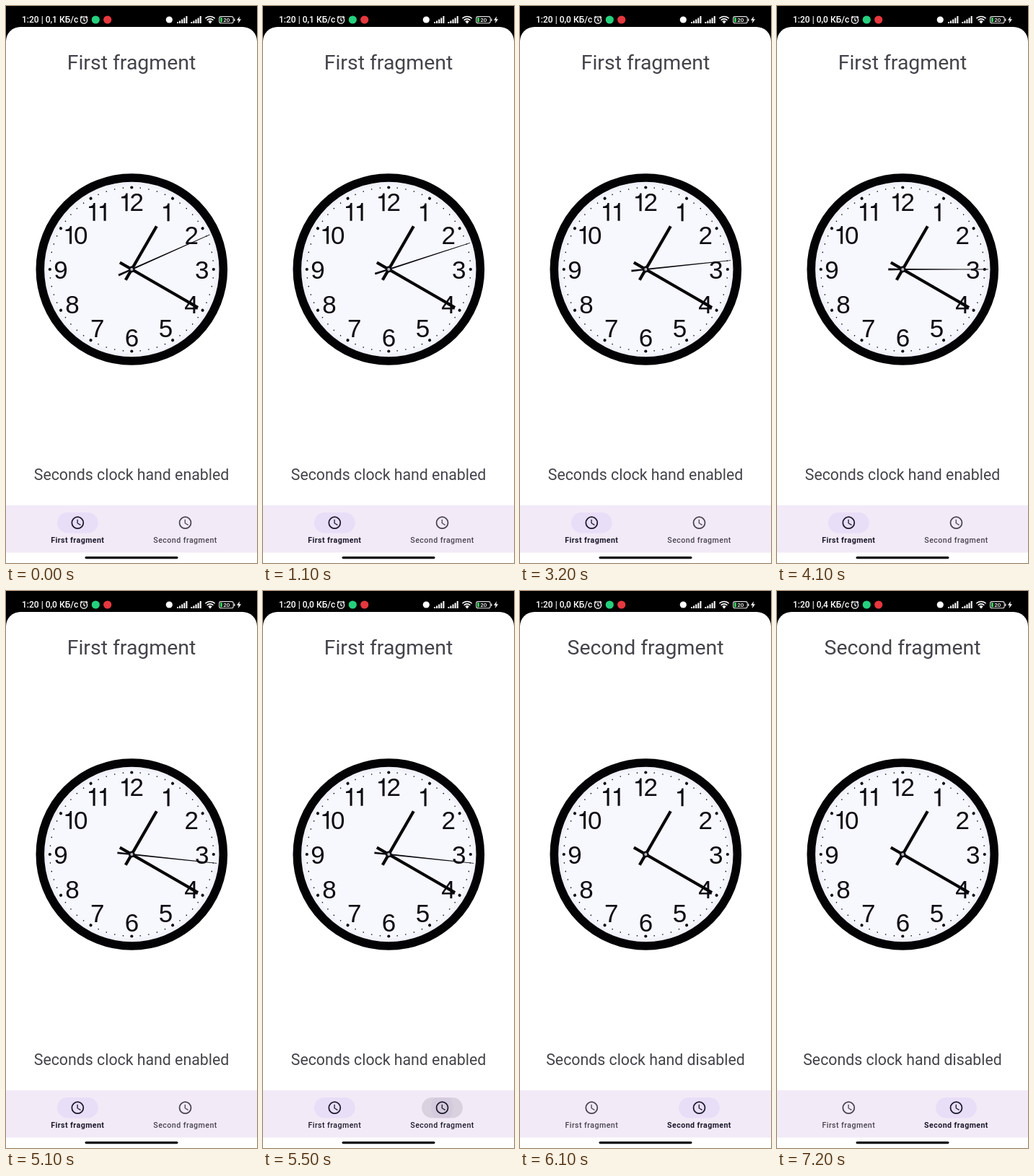
Animation of 348 by 772 pixels, one loop 8000 ms. Source, as an HTML page:

```html
<!DOCTYPE html>
<html lang="en">
<head>
<meta charset="utf-8">
<style>
html, body { margin: 0; height: 100%; overflow: hidden; background: #000; }
svg { display: block; width: 100vw; height: 100vh; font-family: Roboto, sans-serif; }
.mid { text-anchor: middle; }
.digit { font: 35px "Liberation Sans", Arial, sans-serif; text-anchor: middle; }
.label { font-size: 10.63px; letter-spacing: .44px; text-anchor: middle; }
</style>
</head>
<body>
<svg viewBox="0 0 348 772">
  <defs>
    <radialGradient id="face">
      <stop offset=".9" stop-color="#f7f7fe"/>
      <stop offset="1" stop-color="#e6e6f2"/>
    </radialGradient>
    <path id="one" d="M.101-.505V-.568C.22-.58 .255-.6 .282-.703H.346V0H.258V-.505z"/>
    <g id="schedule">
      <circle cx="12" cy="12" r="9" fill="none" stroke="currentColor" stroke-width="2"/>
      <path d="M11 7h1.5v5.25l4.5 2.67-.75 1.23L11 13z" fill="currentColor"/>
    </g>
    <path id="bars" d="M0 24v-2h2v2zM3.1 24v-3.5h2v3.5zM6.2 24v-5.5h2v5.5zM9.3 24v-7.5h2v7.5zM12.4 24v-10h2v10z"/>
  </defs>

  <g id="status" fill="#fff">
    <text id="speed" x="22" y="23.4" font-size="12" font-weight="500"></text>
    <g fill="none" stroke="#fff" stroke-width="1.3">
      <circle cx="108" cy="19.5" r="4.6"/>
      <path d="M108 16.8v3l2 1.2M102.8 16.2l2.6-2.2M113.2 16.2l-2.6-2.2"/>
    </g>
    <circle cx="124.3" cy="19" r="5.6" fill="#25d07d"/>
    <circle cx="140.7" cy="19" r="5.6" fill="#e5383f"/>
    <circle cx="226.3" cy="19" r="4.6"/>
    <use href="#bars" x="237"/>
    <use href="#bars" x="256.3"/>
    <g fill="none" stroke="#fff" stroke-width="1.6">
      <path d="M276.3 17.2a9.5 9.5 0 0 1 13.4 0M278.6 19.7a6.2 6.2 0 0 1 8.8 0"/>
    </g>
    <path d="M280.4 21.4a3.7 3.7 0 0 1 5.2 0l-2.6 3.2z"/>
    <rect x="295.6" y="14.6" width="19.6" height="9.2" rx="2.6" fill="none" stroke="#ddd" stroke-width="1.1"/>
    <rect x="297" y="16" width="3" height="6.4" rx="1" fill="#35c759"/>
    <path d="M316.2 17.5h1.2v3.4h-1.2z"/>
    <text class="mid" x="305.7" y="22.1" font-size="8" font-weight="500">20</text>
    <path d="M324 14.2l-4 5.6h2.6l-.8 4.2 4.2-5.8h-2.7z"/>
  </g>

  <path d="M0 772V49a20 20 0 0 1 20-20H328a20 20 0 0 1 20 20V772z" fill="#fff"/>
  <text id="title" class="mid" x="174" y="87.6" font-size="28.4" fill="#45434a"></text>
  <text id="note" class="mid" x="174" y="657.4" font-size="21.3" fill="#45434a"></text>

  <g id="clock" transform="translate(174.3 365)" fill="#0c0c12">
    <circle r="127" fill="url(#face)" stroke="#030305" stroke-width="11.6"/>
    <g id="dial"></g>
    <g stroke="#060608" stroke-width="4.2">
      <path d="M0 17V-69" transform="rotate(30)"/>
      <path d="M0 19V-106" transform="rotate(120)"/>
    </g>
    <circle r="4.4"/>
    <path id="second" d="M-1.4 20H1.4L1 0 .4-118.5H-.4L-1 0z"/>
    <circle r="2" fill="#b9b9bd"/>
  </g>

  <path d="M0 692H348V757.5H0z" fill="#f2eaf7"/>
  <g id="nav"></g>
  <rect x="109.5" y="763" width="129" height="3.2" rx="1.6" fill="#08080a"/>
</svg>
<script>
const $ = id => document.getElementById(id);
const clamp = v => Math.min(1, Math.max(0, v));

// Dial: minute dots, then [digit, x, y] relative to the clock centre
let dial = '';
for (let i = 0; i < 60; i++)
  dial += `<circle cy="-113.5" r="${i % 5 ? .8 : 2.1}" transform="rotate(${i * 6})"/>`;
const digits = [
  [1, -10, -93], [2, 7, -93], [1, 48, -79], [2, 83, -46.8], [3, 97.4, .8],
  [4, 82.7, 48.4], [5, 47.2, 82], [6, .2, 95], [7, -47.6, 82], [8, -82.3, 49],
  [9, -98.3, 1], [1, -87.5, -47.5], [0, -70.6, -47.5], [1, -55, -79.5], [1, -40, -79.5]];
for (const [d, x, y] of digits)
  dial += d === 1
    ? `<use href="#one" transform="translate(${x - 7.8} ${y + 12.2}) scale(35)"/>`
    : `<text class="digit" x="${x}" y="${y + 12.2}">${d}</text>`;
$('dial').innerHTML = dial;

const pill = (name, fill) => `<rect class="${name}" x="-28.4" y="-14.2" width="56.8" height="28.4" rx="14.2" fill="${fill}"/>`;
const names = ['First fragment', 'Second fragment'];
$('nav').innerHTML = names.map((name, i) => `
  <g transform="translate(${[99.3, 248.5][i]} 716.2)">
    ${pill('mark', '#e8def8')}${pill('ripple', '#000')}
    <use href="#schedule" transform="scale(.886) translate(-12 -12)"/>
    <text class="label" y="27.6" fill="currentColor">${name}</text>
  </g>`).join('');
const tabs = [...$('nav').children];

function setTab(tab, on, scale, alpha, ripple) {
  const mark = tab.querySelector('.mark');
  mark.setAttribute('transform', `scale(${scale} 1)`);
  mark.setAttribute('opacity', alpha);
  tab.querySelector('.ripple').setAttribute('opacity', ripple);
  tab.style.color = on > .4 ? '#1d192b' : '#49454f';
  tab.querySelector('.label').style.fontWeight = on > .6 ? 700 : 500;
}

function draw(now) {
  const t = Math.floor(now % 8000 / 100) * 100;   // the screen refreshes ten times a second
  const switched = t >= 5600;
  $('speed').textContent = `1:20 | 0,${t < 3100 ? 1 : t < 7100 ? 0 : 4} КБ/с`;
  $('title').textContent = names[+switched];
  $('note').textContent = `Seconds clock hand ${switched ? 'disabled' : 'enabled'}`;

  const ticks = Math.max(0, Math.floor((t - 100) / 1000));
  $('second').setAttribute('transform', `rotate(${66 + ticks * 6})`);
  $('second').setAttribute('visibility', switched ? 'hidden' : 'visible');

  const p = clamp((t - 5400) / 200);
  const ripple = .1 * (clamp((t - 5200) / 300) - clamp((t - 5600) / 200));
  setTab(tabs[0], 1 - p, 1, switched ? 0 : 1, 0);
  setTab(tabs[1], p, .1 + .9 * p, p, ripple);
}

const start = performance.now();
(function loop() {
  draw(performance.now() - start);
  requestAnimationFrame(loop);
})();
</script>
</body>
</html>
```
